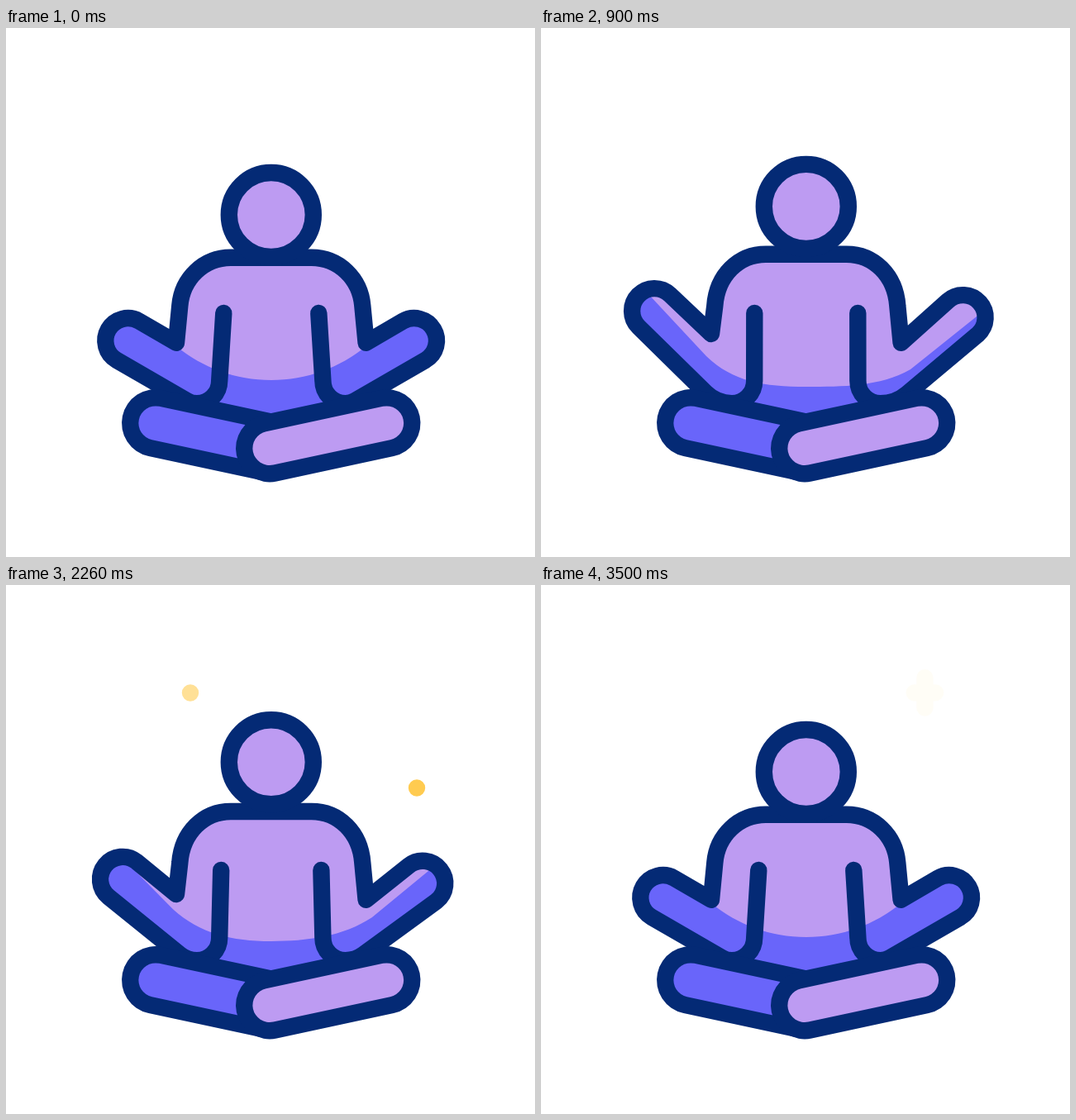
These frames come from a looping animation (640 by 640 pixels, 3.6 s). An HTML page with a canvas:

```html
<!DOCTYPE html>
<html lang="en">
<head>
<meta charset="utf-8">
<title>Meditation</title>
<style>
  html, body { margin: 0; width: 100%; height: 100%; overflow: hidden; background: #fff; }
  canvas { display: block; width: 640px; height: 640px; }
</style>
</head>
<body>
<canvas id="stage"></canvas>
<script>
const canvas = document.getElementById('stage');
const ctx = canvas.getContext('2d');
const dpr = window.devicePixelRatio || 1;
canvas.width = canvas.height = 640 * dpr;

const LOOP = 3600, STEP = 20, LAST = 3500;
const NAVY = '#042a75', PINK = '#bd9bf2', INDIGO = '#6965fa', GOLD = '#ffcb50';
const LINE = 20.4, PALM = 27.2, ELBOW = { x: 231, y: 427 };
const WIDTH = 641.6;   // mirror axis is WIDTH / 2
const MID = WIDTH / 2;

const clamp = v => Math.max(0, Math.min(1, v));
const mix = (a, b, k) => a + (b - a) * k;
const mixAll = (a, b, k) => a.map((v, i) => mix(v, b[i], k));
const span = (t, a, b) => clamp((t - a) / (b - a));
const flip = x => WIDTH - x;
const rad = deg => deg * Math.PI / 180;

// 0 -> 1 -> 0: breathe in, hold, breathe out
const breath = (t, up, down) => t < 2000 ? span(t, 0, up) : 1 - span(t, 2000, down);

// Arm geometry in left-side coordinates.
function arm(hx, hy, pitY, deg, capX) {
  const pit = { x: 206, y: pitY };
  const dx = pit.x - hx, dy = pit.y - hy;
  const top = Math.atan2(dy, dx) + Math.asin(PALM / Math.hypot(dx, dy));
  const low = rad(deg);
  const floor = ELBOW.y + PALM;
  const ly = hy + PALM * Math.cos(low);
  const bend = hx - PALM * Math.sin(low) + (floor - ly) / Math.tan(low);
  const back = Math.max(0, ELBOW.x - bend);
  return {
    hx, hy, pit, top, low, floor, bend, capX,
    sx: bend - back * Math.cos(low),
    sy: floor - back * Math.sin(low)
  };
}

function outline(l, r, y) {
  const p = new Path2D(), q = Math.PI / 2;
  p.moveTo(l.capX, 345);
  p.lineTo(ELBOW.x + PALM, ELBOW.y);
  p.arc(ELBOW.x, ELBOW.y, PALM, 0, q);
  p.quadraticCurveTo(l.bend, l.floor, l.sx, l.sy);
  p.arc(l.hx, l.hy, PALM, l.low + q, l.top + 3 * q);
  p.lineTo(l.pit.x, l.pit.y);
  p.lineTo(210.3, 336);
  p.bezierCurveTo(213, y + 25.5, 239, y, 272, y);
  p.lineTo(flip(272), y);
  p.bezierCurveTo(flip(239), y, flip(213), y + 25.5, flip(210.3), 336);
  p.lineTo(flip(r.pit.x), r.pit.y);
  p.arc(flip(r.hx), r.hy, PALM, -r.top - q, q - r.low);
  p.lineTo(flip(r.sx), r.sy);
  p.quadraticCurveTo(flip(r.bend), r.floor, flip(ELBOW.x), r.floor);
  p.arc(flip(ELBOW.x), ELBOW.y, PALM, q, 2 * q);
  p.lineTo(flip(r.capX), 345);
  return p;
}

// Adds the belly between the arms to the outlined area.
function interior(edge, l, r) {
  const p = new Path2D(edge);
  p.moveTo(l.capX, 325);
  p.lineTo(flip(r.capX), 325);
  p.lineTo(flip(r.capX), 345);
  p.lineTo(flip(ELBOW.x + PALM), ELBOW.y);
  p.lineTo(flip(ELBOW.x), 454);
  p.lineTo(MID, 490);
  p.lineTo(ELBOW.x, 454);
  p.lineTo(ELBOW.x + PALM, ELBOW.y);
  p.closePath();
  return p;
}

function shade(k) {
  const rest = [278, 426, 238, 411, 206, 385, 155, 340];
  const l = mixAll(rest, [270, 434, 232, 428, 200, 397, 130, 322], k);
  const r = mixAll(rest.map((v, i) => i % 2 ? v : flip(v)),
                   [365, 434, 410, 434, 447, 413, 532, 345], k);
  const y = mix(426, 434, k);
  ctx.beginPath();
  ctx.moveTo(60, 600);
  ctx.lineTo(60, l[7]);
  ctx.lineTo(l[6], l[7]);
  ctx.lineTo(l[4], l[5]);
  ctx.bezierCurveTo(l[2], l[3], l[0], l[1], MID, y);
  ctx.bezierCurveTo(...r.slice(0, 6));
  ctx.lineTo(r[6], r[7]);
  ctx.lineTo(580, r[7]);
  ctx.lineTo(580, 600);
  ctx.fillStyle = INDIGO;
  ctx.fill();
}

function bar(x1, y1, x2, y2, width, color) {
  ctx.beginPath();
  ctx.moveTo(x1, y1);
  ctx.lineTo(x2, y2);
  ctx.lineWidth = width;
  ctx.strokeStyle = color;
  ctx.stroke();
}

function leg(x1, y1, x2, y2, color) {
  bar(x1, y1, x2, y2, 82, NAVY);
  bar(x1, y1, x2, y2, 41.2, color);
}

function body(t) {
  const k = breath(t, 870, 2680);
  const lift = t < 2000 ? breath(t, 1380, 2680) : k;
  const capX = mix(263.3, 258.3, k);
  const l = arm(mix(147.5, 137.3, k), mix(378.3, 342.3, k), mix(380.8, 370, k), mix(30, 44.5, k), capX);
  const r = arm(mix(147.8, 131.2, k), mix(378.3, 350.3, k), 380.8, mix(30, 40, k), capX);
  const edge = outline(l, r, mix(277.7, 271.6, lift));
  const inside = interior(edge, l, r);

  ctx.fillStyle = PINK;
  ctx.fill(inside);
  ctx.save();
  ctx.clip(inside);
  shade(k);
  ctx.restore();
  ctx.lineWidth = LINE;
  ctx.strokeStyle = NAVY;
  ctx.stroke(edge);

  leg(181, 478, 314, 506.5, INDIGO);
  leg(319, 508.4, 460.5, 478, PINK);

  ctx.beginPath();
  ctx.arc(MID, mix(226, 210.5, breath(t, 1380, 3065)), 51, 0, 7);
  ctx.fillStyle = PINK;
  ctx.fill();
  ctx.lineWidth = LINE;
  ctx.strokeStyle = NAVY;
  ctx.stroke();
}

const LIFE = 800;
const sparkles = [
  { x: 497, y: 250.5, rise: 20, born: 2060 },
  { x: 223, y: 132.7, rise: 15, born: 2140 },
  { x: 155, y: 217.7, rise: 25, born: 2280 },
  { x: 464.4, y: 162, rise: 32, born: 2710 }
];

function sparkle(s, t) {
  const age = t - s.born;
  if (age <= 0 || age >= LIFE) return;
  const grow = 1 - Math.pow(1 - span(age, 200, 380), 3);
  const settle = span(age, 380, 700);
  const w = mix(10, mix(31, 22.7, settle), grow) - 10;
  const h = mix(10, mix(32, 28.2, settle), grow) - 10;
  const y = s.y - s.rise * age / LIFE;
  ctx.globalAlpha = Math.min(1, age / 200, (LIFE - age) / 200);
  ctx.beginPath();
  ctx.moveTo(s.x - w, y);
  ctx.lineTo(s.x + w + 0.01, y);
  ctx.moveTo(s.x, y - h);
  ctx.lineTo(s.x, y + h + 0.01);
  ctx.lineWidth = 20.4;
  ctx.strokeStyle = GOLD;
  ctx.stroke();
  ctx.globalAlpha = 1;
}

function draw(t) {
  ctx.setTransform(dpr, 0, 0, dpr, 0, 0);
  ctx.fillStyle = '#fff';
  ctx.fillRect(0, 0, 640, 640);
  ctx.lineCap = ctx.lineJoin = 'round';
  body(t);
  sparkles.forEach(s => sparkle(s, t));
}

const start = performance.now();
function tick() {
  const t = (performance.now() - start) % LOOP;
  draw(Math.min(LAST, Math.floor(t / STEP) * STEP));
  requestAnimationFrame(tick);
}
tick();
</script>
</body>
</html>
```
